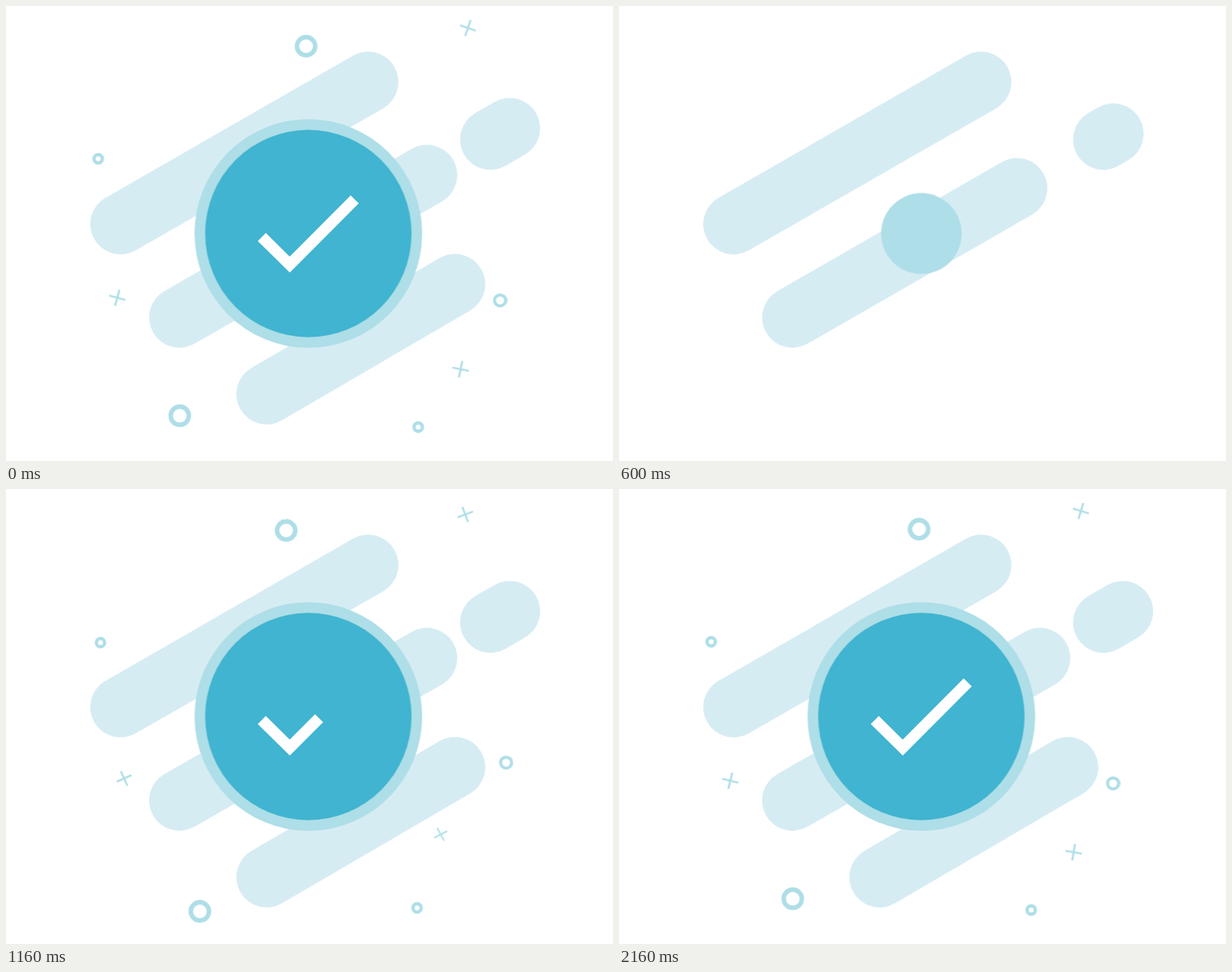
An HTML page that plays this animation: 800 by 600 pixels, repeating every 2200 ms.

```html
<!DOCTYPE html>
<html lang="en">
<head>
<meta charset="utf-8">
<title>Check mark</title>
<style>
html, body { margin: 0; width: 100%; height: 100%; overflow: hidden; background: #fff; }
svg { display: block; width: 100vw; height: 100vh; }

/* The cycle resets 200 ms into the loop, hence the negative delay. */
svg * {
  animation-duration: 2200ms;
  animation-delay: -2000ms;
  animation-iteration-count: infinite;
  animation-timing-function: cubic-bezier(.37, 0, .63, 1);
}

.bars { stroke: #d6ecf3; stroke-width: 80; stroke-linecap: round; }
.bars path, .check { fill: none; stroke-dasharray: 1 9; }
.check { stroke: #fff; stroke-width: 15; animation-name: check; }
.bar1 { animation-name: bar1; }
.bar2 { animation-name: bar2; }
.bar3 { animation-name: bar3; }
.pill { animation-name: pill; }

.marks { fill: none; stroke: #aedee7; }
.rings { animation-name: rings; }
.orbit { animation-name: orbit; animation-timing-function: cubic-bezier(.333, 1, .667, 1); }
.dots { animation-name: dots; }
.plus1 { animation-name: plus1; }
.plus2 { animation-name: plus2; }
.plus3 { animation-name: plus3; }
.spin { stroke-width: 2.7; animation-name: spin; animation-timing-function: linear; }

.rim { fill: #aedee7; animation-name: rim; }
.disc { fill: #40b4d0; animation-name: disc; }

@keyframes bar1 {
  0%, 1.4% { visibility: hidden; stroke-dashoffset: 1; }
  12.3%, 100% { visibility: visible; stroke-dashoffset: 0; }
}
@keyframes bar2 {
  0%, 9.45% { visibility: hidden; stroke-dashoffset: 1; }
  20.4%, 100% { visibility: visible; stroke-dashoffset: 0; }
}
@keyframes pill {
  0%, 12.7% { visibility: hidden; stroke-dashoffset: 1; }
  23.6%, 100% { visibility: visible; stroke-dashoffset: 0; }
}
@keyframes bar3 {
  0%, 19.5% { visibility: hidden; stroke-dashoffset: 1; }
  30.5%, 100% { visibility: visible; stroke-dashoffset: 0; }
}
@keyframes check {
  0%, 36.4% { visibility: hidden; stroke-dashoffset: 1; }
  49.1%, 100% { visibility: visible; stroke-dashoffset: 0; }
}

@keyframes rim {
  0%, 10.3% { transform: scale(0); }
  29.8%, 100% { transform: scale(1); }
}
@keyframes disc {
  0%, 18.2% { transform: scale(0); }
  36.1%, 100% { transform: scale(1); }
}
@keyframes rings {
  0%, 18.4% { transform: scale(0); }
  37.2%, 100% { transform: scale(1); }
}
@keyframes orbit {
  0%, 18.2% { transform: rotate(-24.8deg); }
  86.5%, 100% { transform: rotate(0deg); }
}
@keyframes dots {
  0%, 26.7% { transform: scale(0); }
  44.9%, 100% { transform: scale(1); }
}
@keyframes plus1 {
  0%, 27% { transform: scale(0); opacity: 0; }
  45.2%, 100% { transform: scale(1); opacity: 1; }
}
@keyframes plus2 {
  0%, 27.7% { transform: scale(0); opacity: 0; }
  45.9%, 100% { transform: scale(1); opacity: 1; }
}
@keyframes plus3 {
  0%, 29.8% { transform: scale(0); opacity: 0; }
  48%, 100% { transform: scale(1); opacity: 1; }
}
@keyframes spin {
  0% { transform: rotate(-76.8deg); }
  91.8%, 100% { transform: rotate(0deg); }
}
</style>
</head>
<body>
<svg viewBox="0 0 800 600">
  <defs>
    <path id="cross" d="M-11 0H11M0 -11V11"/>
  </defs>

  <g class="bars">
    <path class="bar1" pathLength="1" d="M151 287.6L477.2 100.2"/>
    <path class="bar2" pathLength="1" d="M228.6 410.7L554.8 223"/>
    <path class="pill" pathLength="1" d="M638.4 176L664 161.2"/>
    <path class="bar3" pathLength="1" d="M343.6 511.8L591.7 366.9"/>
  </g>

  <g transform="translate(398.5 300)">
    <g class="marks">
      <g class="rings">
        <g class="orbit">
          <circle cx="-3" cy="-247" r="12" stroke-width="6"/>
          <circle cx="-169.5" cy="240.3" r="12" stroke-width="6"/>
          <circle cx="252.7" cy="88.2" r="7.3" stroke-width="4"/>
        </g>
      </g>
      <g class="dots" stroke-width="4.5">
        <circle cx="-277" cy="-98.5" r="5.5"/>
        <circle cx="144.8" cy="255.2" r="5.5"/>
      </g>
      <g class="plus1">
        <g transform="translate(210.3 -271) rotate(19.5)"><use class="spin" href="#cross"/></g>
      </g>
      <g class="plus2">
        <g transform="translate(-251.8 84.7) rotate(16)"><use class="spin" href="#cross"/></g>
      </g>
      <g class="plus3">
        <g transform="translate(200.7 179) rotate(12)"><use class="spin" href="#cross"/></g>
      </g>
    </g>
    <ellipse class="rim" rx="150" ry="150.8"/>
    <ellipse class="disc" rx="136" ry="136.7"/>
  </g>

  <path class="check" pathLength="1" d="M337.1 304.6L374 341L459.6 255"/>
</svg>
</body>
</html>
```
